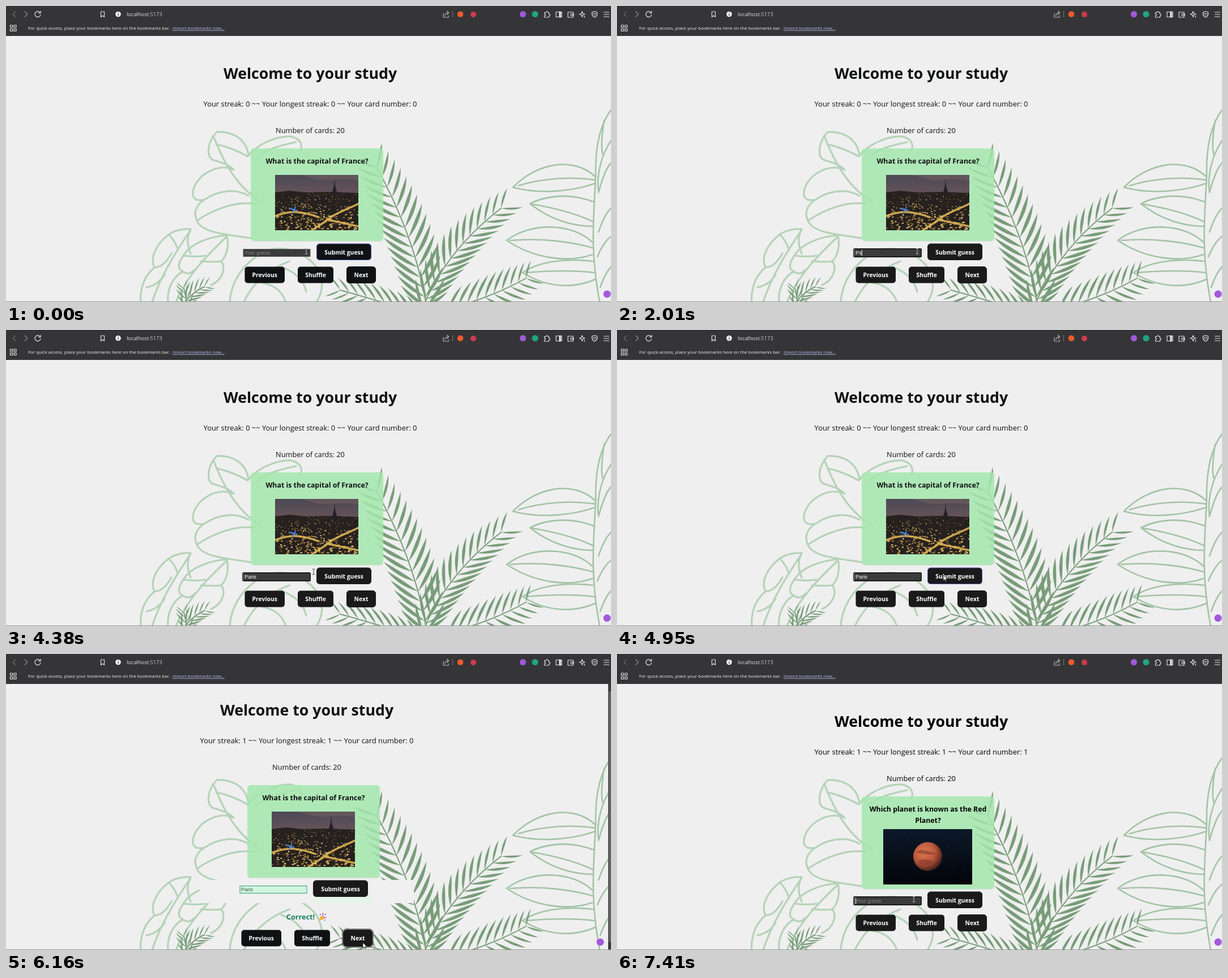
Write an HTML page that moves like this. It is 1068 by 524 pixels and loops after 7.99 s.

```html
<!DOCTYPE html>
<html lang="en">
<head>
<meta charset="utf-8">
<title>Flashcards</title>
<style>
  html, body { margin: 0; width: 100%; height: 100%; overflow: hidden; background: #efefef; }
  svg { display: block; width: 1068px; height: 524px; }
  text { font-family: "Open Sans", "Noto Sans", sans-serif; white-space: pre; }
  .bold { font-weight: 700; }
  .mid { text-anchor: middle; }
  .label { font-size: 10.35px; font-weight: 700; fill: #fff; text-anchor: middle; }
  .field { font: 9.2px "Liberation Sans", Arial, sans-serif; }
  .line { fill: none; stroke-linecap: round; stroke-linejoin: round; }
</style>
</head>
<body>
<svg viewBox="0 0 1068 524" xmlns="http://www.w3.org/2000/svg">
  <defs>
    <linearGradient id="dusk" x2="0" y2="1"><stop stop-color="#4b4956"/><stop offset="1" stop-color="#6b5557"/></linearGradient>
    <linearGradient id="space" x2="0" y2="1"><stop stop-color="#0c1929"/><stop offset="1" stop-color="#020409"/></linearGradient>
    <radialGradient id="planet" cx=".38" cy=".35" r=".7">
      <stop stop-color="#dc7a52"/><stop offset=".55" stop-color="#b9563a"/><stop offset="1" stop-color="#3a1a18"/>
    </radialGradient>
    <clipPath id="cityClip"><rect x="475" y="299" width="147" height="98"/></clipPath>
  </defs>
  <rect width="1068" height="524" fill="#efefef"/>

  <g class="line" stroke="#b5d2b7" stroke-width="3.2">
    <path d="M428 264C424 236 402 222 372 223C356 240 353 264 364 272C378 277 392 279 402 290C376 278 340 296 331 324C327 340 334 346 350 343C336 352 330 366 337 380C346 402 388 404 432 411"/>
    <path d="M366 230C386 282 410 322 452 348M372 245C396 250 412 258 426 266M350 343C378 324 408 324 428 336M337 380C372 356 410 346 440 350"/>
    <path d="M427 266C446 242 480 230 503 231C520 235 524 245 520 256M443 268C462 252 488 246 512 241"/>
    <path d="M238 524C236 500 244 478 262 463C254 446 264 422 288 404C300 396 316 394 326 395C318 410 320 424 326 438"/>
    <path d="M326 396C304 430 276 470 258 524M262 463C276 462 284 452 292 438M248 498C262 496 272 488 280 476M288 405C296 414 300 420 302 428"/>
    <path d="M390 406C360 408 326 420 313 442C302 458 304 466 312 470C294 480 284 502 286 524M390 406C394 424 390 442 380 452C390 466 380 486 362 494"/>
    <path d="M390 408C352 444 318 480 300 524M313 442C330 444 342 444 352 442M312 470C320 476 326 474 334 466M380 452C366 454 352 452 344 452"/>
    <path d="M395 524C398 482 424 450 462 432C500 424 528 438 548 462C562 486 560 506 548 524M420 524C436 490 462 466 500 452M452 490C474 494 488 506 494 524M486 462C510 470 526 486 530 506"/>
  </g>
  <g class="line" stroke="#a3c3a5" stroke-width="2.6">
    <path d="M1068 184C1046 214 1040 258 1041 300C1038 370 1030 430 1048 524M1068 238C1050 266 1042 300 1046 330C1054 300 1062 284 1068 278M1056 202C1052 226 1050 246 1053 262"/>
    <path d="M1040 302C1000 264 934 280 895 321C942 334 1000 328 1040 314M905 318C950 304 1000 302 1040 308"/>
    <path d="M1038 347C994 330 952 336 925 350C960 378 1000 390 1037 390M930 351C970 358 1008 368 1037 382"/>
    <path d="M1035 418C1000 384 926 382 884 415C930 446 990 456 1035 440M890 415C946 410 1000 418 1035 428"/>
    <path d="M1036 452C990 446 940 452 912 472C956 500 1004 500 1040 484M918 472C964 468 1004 468 1038 472"/>
    <path d="M1046 400C1054 376 1062 364 1068 358M1044 444C1052 424 1062 412 1068 408M1049 498C1056 478 1062 468 1068 462"/>
  </g>
  <g id="ferns" fill="#789d79"></g>

  <g id="extras">
    <rect x="342" y="400" width="378" height="41" fill="#f0f0f0"/>
    <rect id="tint" x="542" y="426" width="106" height="15" fill="#e4f4e8"/>
    <text class="bold mid" x="520" y="470" font-size="12.7" fill="#16805c">Correct!</text>
    <g transform="translate(552 460)">
      <path d="M0 12L4 3L10 9Z" fill="#f2b632"/>
      <path class="line" d="M6 5Q9 2 7-1M8 7Q11 5 13 7" stroke="#e0457b" stroke-width="1.4"/>
      <path d="M2 0h2v2h-2zM11 0h2v2h-2zM10 10h2v2h-2z" fill="#4f86dc"/>
    </g>
    <rect x="1063" y="53" width="5" height="471" fill="#3b3b3d"/>
    <rect x="1064" y="66" width="4" height="444" fill="#636365"/>
  </g>

  <g id="page">
    <text id="title" class="bold mid" x="537" y="128.5" font-size="26.7">Welcome to your study</text>
    <text id="stats" class="mid" x="537" y="178" font-size="12.9"></text>
    <text id="count" class="mid" x="537" y="225" font-size="12.8">Number of cards: 20</text>
    <rect x="432" y="253" width="234" height="164" rx="6" fill="#000" opacity=".07"/>
    <rect x="432" y="252" width="234" height="164" rx="6" fill="#a6eab0" opacity=".84"/>
    <g id="capital">
      <text class="bold mid" x="549" y="279" font-size="12.35" fill="#101112">What is the capital of France?</text>
      <g clip-path="url(#cityClip)">
        <rect x="475" y="299" width="147" height="40" fill="url(#dusk)"/>
        <path d="M520 299H622V309C590 302 568 312 546 306Z" fill="#72605f" opacity=".6"/>
        <path d="M475 330L500 327L530 330L570 329L622 331V397H475Z" fill="#26211f"/>
        <path d="M580 306L581 318L585 333H575L579 318Z" fill="#242027"/>
        <g id="lights"></g>
        <path class="line" d="M622 350C598 362 578 368 566 380L540 397M566 378L622 390M475 372C500 362 520 362 552 374" stroke="#e9bd58" stroke-width="3.5" opacity=".85"/>
        <path class="line" d="M500 358L514 362M506 366L511 356" stroke="#4c86e0" stroke-width="2"/>
      </g>
    </g>
    <g id="mars">
      <text class="bold mid" x="549" y="279" font-size="12.35">Which planet is known as the Red</text>
      <text class="bold mid" x="549" y="299" font-size="12.35">Planet?</text>
      <rect x="470" y="310" width="157" height="98" fill="url(#space)"/>
      <g id="stars"></g>
      <circle cx="548.5" cy="358.5" r="25.5" fill="url(#planet)"/>
      <path d="M528 350Q540 344 552 350T570 348Q564 356 550 355T528 350ZM532 366Q546 360 558 368Q548 376 536 372Z" fill="#7d3427" opacity=".55"/>
    </g>
    <rect id="fieldRing" x="417.5" y="429.5" width="120" height="15" rx="1" fill="#fff" stroke="#151515"/>
    <rect id="fieldBox" x="419" y="430.5" width="118" height="13"/>
    <text id="fieldText" class="field" x="421" y="440"></text>
    <rect id="caret" y="432" width="1" height="10.5" fill="#fff"/>
    <g id="submit"></g>
  </g>
  <g id="nav"></g>
  <circle id="badge" cy="510" r="6.5" fill="#a259dc"/>
  <rect y="523" width="1068" height="1" fill="#8f968f"/>

  <rect width="1068" height="53" fill="#353537"/>
  <rect width="1068" height="1" fill="#25272d"/>
  <g class="line" stroke="#e4e4e6" stroke-width="1.2">
    <path d="M17 10L12 14.5L17 19" stroke="#6f6f72"/><path d="M33 10L38 14.5L33 19" stroke="#8d8d90"/>
    <path d="M60 11.5A5 5 0 1 0 61 15.5M61 9V12.5H57.5"/>
    <path d="M167.500 10h6v9.500l-3-2.500l-3 2.500z"/>
    <path d="M7.500 34h4v4h-4zM14 34h4v4h-4zM7.500 40.500h4v4h-4zM14 40.500h4v4h-4z"/>
    <path d="M772 13v7h9v-3M775 17c0-4 2-5 6-5M778.500 9l3 3l-3 3" stroke="#b5b5b8"/>
    <path d="M788.500 9.500v10" stroke="#6f6f72"/>
    <path d="M950.500 11.500h3q0-2 1.500-2t1.500 2h2v3q2 0 2 1.500t-2 1.500v2.500h-8v-3q2-.5 2-1.500t-2-1.500z"/>
    <path d="M971 10.500h10v9h-10z"/><path d="M978 11v8" stroke-width="3.500"/>
    <path d="M992 11h9v9h-9zM997 14h5v3h-5z"/>
    <path d="M1017 9.500l1.300 3.700l3.700 1.300l-3.700 1.300l-1.300 3.700l-1.300-3.700l-3.700-1.300l3.700-1.300zM1021 17.500v3"/>
    <path d="M1039 9.500l4.500 1.500v4q-1 3.500-4.500 5q-3.500-1.500-4.500-5v-4zM1036.500 14q2.500-2 5 0M1038 16h2"/>
    <path d="M1055.500 11h9M1055.500 15h9M1055.500 19h9"/>
  </g>
  <circle cx="198" cy="14.500" r="4.800" fill="#fff"/><path d="M198 13.500v4M198 11v1.300" stroke="#353537" stroke-width="1.300"/>
  <circle cx="802" cy="14.500" r="5.300" fill="#f05a2b"/><circle cx="825" cy="15" r="5" fill="#d23b4e"/>
  <circle cx="912.500" cy="14.500" r="5.500" fill="#a259dc"/><circle cx="934" cy="14.500" r="5.500" fill="#1fa583"/>
  <text x="213" y="18" font-size="9.300" fill="#e8e8ea">localhost<tspan fill="#c5c5c9">:5173</tspan></text>
  <text x="39" y="42" font-size="7.930" fill="#f1f1f3">For quick access, place your bookmarks here on the bookmarks bar.</text>
  <text x="294" y="42" font-size="7.870" fill="#b9bdf2" text-decoration="underline">Import bookmarks now...</text>

  <path id="beam" class="line" d="M-2-5Q0-5 0-4Q0-5 2-5M0-4V4M-2 5Q0 5 0 4Q0 5 2 5" stroke-width="1"/>
  <path id="arrow" d="M0 0V9.500L2.300 7.500L3.900 11L5.400 10.300L3.800 7H6.800Z" fill="#fff" stroke="#222" stroke-width=".8"/>
</svg>
<script>
const LOOP = 7990;
const $ = id => document.getElementById(id);
const show = (id, on) => $(id).setAttribute('visibility', on ? 'inherit' : 'hidden');
const move = (id, x, y) => $(id).setAttribute('transform', `translate(${x} ${y})`);
const paint = (id, fill, stroke = 'none') => {
  $(id).setAttribute('fill', fill);
  $(id).setAttribute('stroke', stroke);
};
const write = (id, text) => { if ($(id).textContent !== text) $(id).textContent = text; };
const latest = (track, t) => track.reduce((found, key) => key[0] <= t ? key : found);
const within = (t, from, to) => t >= from && t < to;

function randomizer(seed) {
  return () => (seed = seed * 16807 % 2147483647) / 2147483647;
}

// Quadratic stem from base to tip with paired, lens-shaped blades.
function fern([x0, y0], [cx, cy], [x1, y1], count, length, spread) {
  const at = (a, b, c, t) => (1 - t) ** 2 * a + 2 * t * (1 - t) * b + t * t * c;
  let d = '';
  for (let i = 0; i < count; i++) {
    const t = (i + 1) / count, x = at(x0, cx, x1, t), y = at(y0, cy, y1, t);
    const along = Math.atan2((1 - t) * (cy - y0) + t * (y1 - cy), (1 - t) * (cx - x0) + t * (x1 - cx));
    const size = length * (0.5 + 0.5 * Math.sin(Math.PI * (0.25 + 0.65 * t)));
    for (const side of [-1, 1]) {
      const angle = along + side * spread;
      const dx = Math.cos(angle), dy = Math.sin(angle);
      const bend = side * size * 0.07, half = size * 0.1;
      const bow = k => `${(x + dx * size * .5 - dy * k).toFixed(1)} ${(y + dy * size * .5 + dx * k).toFixed(1)}`;
      d += `M${x} ${y}Q${bow(bend + half)} ${x + dx * size} ${y + dy * size}Q${bow(bend - half)} ${x} ${y}`;
    }
  }
  return `<path d="${d}"/><path class="line" stroke="#789d79" stroke-width="2" d="M${x0} ${y0}Q${cx} ${cy} ${x1} ${y1}"/>`;
}
$('ferns').innerHTML = [
  fern([745, 550], [728, 420], [654, 285], 15, 66, 0.72),
  fern([730, 550], [768, 440], [874, 358], 14, 58, 0.62),
  fern([765, 540], [850, 520], [918, 482], 10, 50, 0.8),
  fern([745, 550], [670, 525], [590, 503], 10, 44, 0.65),
  fern([305, 540], [322, 510], [350, 497], 6, 30, 0.6),
  fern([322, 545], [318, 515], [314, 500], 4, 26, 0.6)
].join('');

function scatter(id, seed, count, draw) {
  const random = randomizer(seed);
  $(id).innerHTML = Array.from({ length: count }, () => draw(random)).join('');
}
scatter('lights', 71, 330, random => {
  const depth = random(), size = 0.7 + depth * 1.4;
  const color = ['#f3cf74', '#b98a3c', '#765628', '#d8b876'][Math.floor(random() * 4)];
  return `<rect x="${475 + random() * 147}" y="${331 + depth * 64}" width="${size * 1.7}" height="${size}" fill="${color}"/>`;
});
scatter('stars', 19, 30, random =>
  `<circle cx="${471 + random() * 155}" cy="${311 + random() * 96}" r=".5" fill="#527087" opacity=".6"/>`);

const button = (id, x, y, w, h, label) => `
  <rect id="${id}Ring" x="${x - 1}" y="${y - 1}" width="${w + 2}" height="${h + 2}" rx="6" fill="#fff" stroke="#151515"/>
  <rect id="${id}Box" x="${x + .5}" y="${y + .5}" width="${w - 1}" height="${h - 1}" rx="5"/>
  <text class="label" x="${x + w / 2}" y="${y + h / 2 + 4.3}">${label}</text>`;
$('submit').innerHTML = button('guess', 548, 420.5, 97, 29.5, 'Submit guess');
$('nav').innerHTML = button('previous', 421, 461, 71.5, 30, 'Previous')
  + button('shuffle', 514.5, 461, 64, 30, 'Shuffle')
  + button('next', 601, 461, 52, 30, 'Next');

const SUBMITTED = 4970, ADVANCED = 6310;
const typed = [[0, ''], [1720, 'P'], [2010, 'Ps'], [2740, 'P'], [2990, 'Pa'],
  [3270, 'Par'], [3420, 'Pari'], [3980, 'Paris'], [ADVANCED, '']];
const caret = [[0, 0], [150, 1], [880, 0], [1440, 1], [2440, 0], [2740, 1], [4380, 0], [7140, 1]];
const pointer = [[0, 'beam', 530, 434], [4380, 'beam', 543, 428], [4530, 'arrow', 562, 431],
  [4680, 'arrow', 576, 434], [5520, 'arrow', 581, 444], [5650, 'arrow', 597, 469],
  [5780, 'arrow', 616, 494], [5900, 'arrow', 627, 508], [6030, 'arrow', 630, 511],
  [6580, 'arrow', 612, 489], [6720, 'arrow', 560, 450], [6850, 'beam', 524, 434]];

function render(t) {
  const correct = within(t, SUBMITTED, ADVANCED), advanced = t >= ADVANCED;
  const fieldFocus = within(t, 150, SUBMITTED) || t >= 7140;
  const nextFocus = within(t, 6160, 7140), submitFocus = within(t, SUBMITTED, 6160);

  move('page', correct ? -6 : 0, correct ? -20 : 0);
  move('nav', correct ? -6 : 0, correct ? 27 : 0);
  $('badge').setAttribute('cx', correct ? 1049 : 1061);
  show('extras', correct);
  show('tint', correct && t >= 6160);
  show('capital', !advanced);
  show('mars', advanced);

  const streak = t >= SUBMITTED ? 1 : 0;
  write('stats', `Your streak: ${streak} ~~ Your longest streak: ${streak} ~~ Your card number: ${advanced ? 1 : 0}`);
  for (const id of ['title', 'stats', 'count']) paint(id, advanced ? '#000' : '#101112');

  const text = latest(typed, t)[1];
  show('fieldRing', fieldFocus);
  if (correct) paint('fieldBox', '#d1f5df', '#30a079');
  else paint('fieldBox', '#3b3b3b', fieldFocus ? '#222' : '#5b5b5b');
  write('fieldText', text || 'Your guess');
  paint('fieldText', correct ? '#3c5c4e' : text ? '#fff' : '#858585');
  show('caret', latest(caret, t)[1]);
  $('caret').setAttribute('x', 421 + (text ? $('fieldText').getComputedTextLength() : 0));

  const rest = t < 150 || within(t, SUBMITTED, 6160) ? '#101112' : '#1a1a1a';
  const hover = t < 300 || within(t, 4530, SUBMITTED);
  paint('guessBox', rest, hover ? '#4c52b8' : rest);
  paint('previousBox', correct ? '#101112' : rest);
  paint('shuffleBox', correct ? '#101112' : rest);
  paint('nextBox', rest, within(t, 5780, 6160) ? '#4c52b8' : rest);
  show('guessRing', submitFocus);
  show('previousRing', false);
  show('shuffleRing', false);
  show('nextRing', nextFocus);

  const [, shape, x, y] = latest(pointer, t);
  for (const id of ['beam', 'arrow']) show(id, id === shape);
  move(shape, x, y);
  $('beam').setAttribute('stroke', within(t, 4380, 4530) ? '#444' : '#c4c4c4');
}

const start = performance.now();
function tick() {
  render((performance.now() - start) % LOOP);
  requestAnimationFrame(tick);
}
tick();
</script>
</body>
</html>
```
